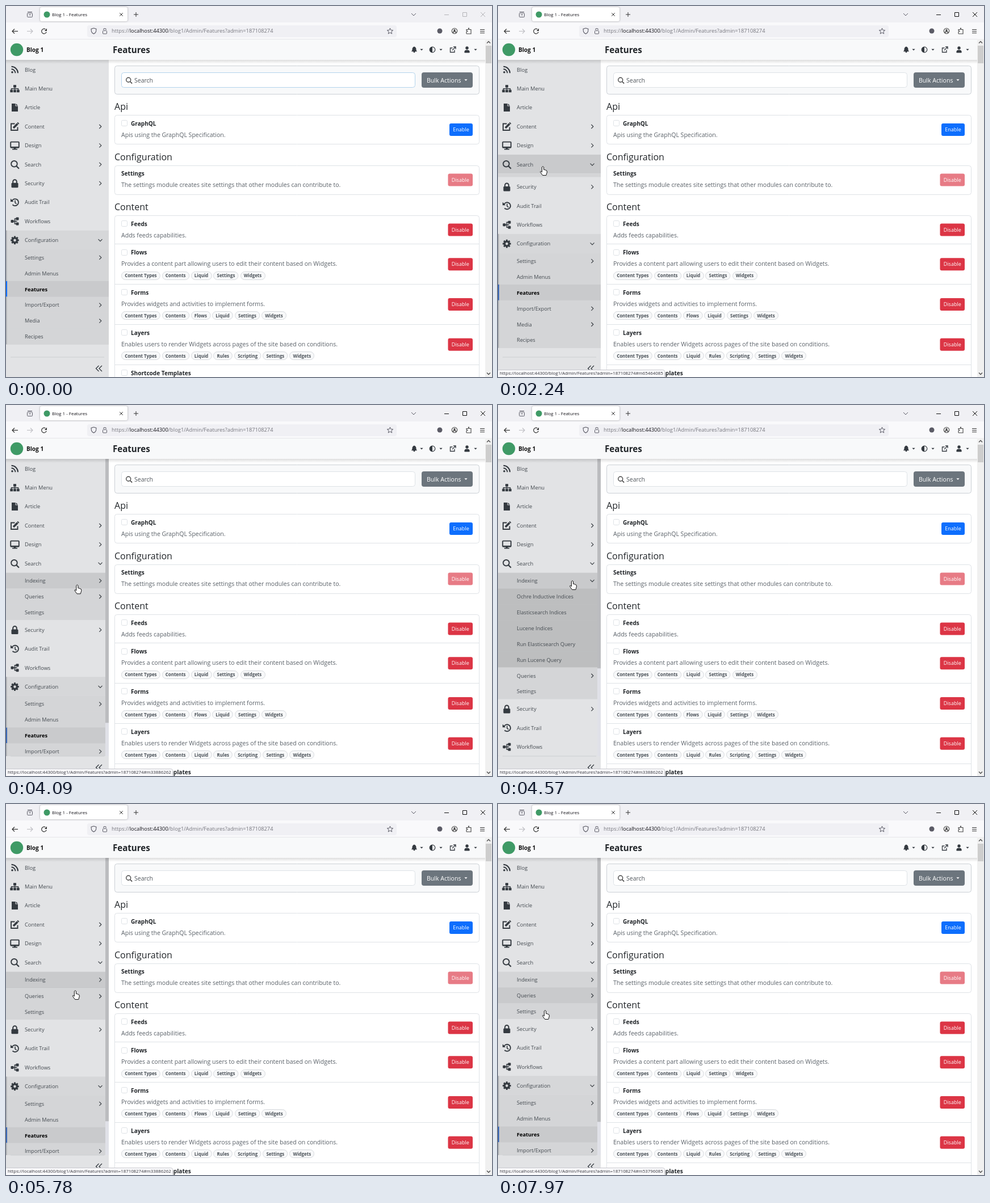
Animation, 856 px wide and 654 px high, one loop 8 s. Source, as an HTML page with a canvas:

```html
<!DOCTYPE html>
<html lang="en">
<head>
<meta charset="utf-8">
<title>Features</title>
<style>
html, body { margin: 0; width: 100%; height: 100%; overflow: hidden; background: #fff; }
canvas { display: block; }
</style>
</head>
<body>
<canvas id="stage" width="856" height="654"></canvas>
<script>
const c = document.getElementById('stage').getContext('2d');
const LOOP = 8000, ROW = 33.4, SUB = 27.9, TOP = 95, BOTTOM = 619;
const INK = '#212529', ICON = '#343a40', GREY = '#5b5b66', GREEN = '#3f9a66';
const URL_HEAD = 'https://', URL_HOST = 'localhost:44300', URL_PATH = '/blog1/Admin/Features?admin=187108274';

// ---- drawing helpers ----
function text(s, x, y, size, color = INK, weight = 400, align = 'left') {
  c.font = `${weight} ${size}px "Open Sans", "Noto Sans", sans-serif`;
  c.fillStyle = color;
  c.textAlign = align;
  c.fillText(s, x, Math.round(y + size * 0.36));
  return c.measureText(s).width;
}
function rect(x, y, w, h, color) {
  c.fillStyle = color;
  c.fillRect(x, y, w, h);
}
function box(x, y, w, h, r, fill, stroke) {
  c.beginPath();
  if (stroke) c.roundRect(Math.round(x) + 0.5, Math.round(y) + 0.5, w, h, r);
  else c.roundRect(x, y, w, h, r);
  if (fill) { c.fillStyle = fill; c.fill(); }
  if (stroke) { c.strokeStyle = stroke; c.lineWidth = 1; c.stroke(); }
}
function trace(pts, x, y) {
  c.beginPath();
  for (let i = 0; i < pts.length; i += 2) c.lineTo(x + pts[i], y + pts[i + 1]);
}
function line(pts, x, y, color, w = 1) {
  trace(pts, x, y);
  c.strokeStyle = color;
  c.lineWidth = w;
  c.stroke();
}
function shape(pts, x, y, color) {
  trace(pts, x, y);
  c.closePath();
  c.fillStyle = color;
  c.fill();
}
function dot(x, y, r, color) {
  c.beginPath();
  c.arc(x, y, r, 0, 7);
  c.fillStyle = color;
  c.fill();
}
function arc(x, y, r, a, b, color, w = 1) {
  c.beginPath();
  c.arc(x, y, r, a, b);
  c.strokeStyle = color;
  c.lineWidth = w;
  c.stroke();
}
const caret = (x, y, color) => shape([-2.6, -1.2, 2.6, -1.2, 0, 1.6], x, y, color);

function magnifier(x, y, r, color, w) {
  arc(x - r * 0.2, y - r * 0.2, r, 0, 7, color, w);
  line([r * 0.55, r * 0.55, r * 1.4, r * 1.4], x, y, color, w * 1.15);
}
function padlock(x, y, s, color) {
  box(x - 6 * s, y - 1 * s, 12 * s, 8.5 * s, 1.5 * s, color);
  c.beginPath();
  c.arc(x, y - 3.2 * s, 3.3 * s, Math.PI, 0);
  c.lineTo(x + 3.3 * s, y);
  c.moveTo(x - 3.3 * s, y - 3.2 * s);
  c.lineTo(x - 3.3 * s, y);
  c.strokeStyle = color;
  c.lineWidth = 2 * s;
  c.stroke();
}

// ---- sidebar icons, centred on x, y ----
const icons = {
  feed(x, y) {
    dot(x - 4.5, y + 4.5, 1.8, ICON);
    arc(x - 6, y + 6, 7, -Math.PI / 2, 0, ICON, 2);
    arc(x - 6, y + 6, 11.5, -Math.PI / 2, 0, ICON, 2);
  },
  tree(x, y) {
    rect(x - 2.5, y - 6.5, 5, 4.5, ICON);
    line([0, -2, 0, 2], x, y, ICON, 1.4);
    line([-6, 3, -6, 0, 6, 0, 6, 3], x, y, ICON, 1.4);
    for (const dx of [-8.2, -2.4, 3.4]) rect(x + dx, y + 2, 4.8, 4.5, ICON);
  },
  file(x, y) {
    shape([-5.5, -7, 1, -7, 1, -2.5, 5.5, -2.5, 5.5, 7, -5.5, 7], x, y, ICON);
    shape([2, -7, 5.5, -3.5, 2, -3.5], x, y, ICON);
  },
  edit(x, y) {
    line([0, -5, -6.5, -5, -6.5, 6.5, 5, 6.5, 5, 1], x, y, ICON, 1.9);
    line([-2.5, 2.5, 4.8, -4.8], x, y, ICON, 3.6);
    line([5.2, -5.2, 6.6, -6.6], x, y, ICON, 3.6);
  },
  screen(x, y) {
    c.beginPath();
    c.roundRect(x - 7.3, y - 6.3, 14.6, 9.8, 1);
    c.strokeStyle = ICON;
    c.lineWidth = 1.9;
    c.stroke();
    rect(x - 7.5, y + 2, 15, 2.5, ICON);
    rect(x - 1.7, y + 4, 3.4, 2.6, ICON);
    rect(x - 4.5, y + 5.8, 9, 1.7, ICON);
  },
  search(x, y) { magnifier(x, y, 5.3, ICON, 1.9); },
  lock(x, y) { padlock(x, y, 1, ICON); },
  history(x, y) {
    arc(x + 0.5, y, 6, -2.7, 2.4, ICON, 1.9);
    shape([-7.5, -6.5, -7.5, -1, -2, -1], x, y, ICON);
    line([0.5, -3.5, 0.5, 0.5, 3, 2.5], x, y, ICON, 1.6);
  },
  nodes(x, y) {
    line([-3, 0, 4, 0], x, y, ICON, 1.6);
    line([4, -4.5, 0, -4.5, 0, 4.5, 4, 4.5], x, y, ICON, 1.6);
    box(x - 7, y - 2.5, 5, 5, 1, ICON);
    box(x + 2, y - 7, 5, 5, 1, ICON);
    box(x + 2, y + 2, 5, 5, 1, ICON);
  },
  gear(x, y) {
    arc(x, y, 4, 0, 7, ICON, 3.4);
    for (let i = 0; i < 8; i++) {
      const a = i * Math.PI / 4, u = Math.cos(a), v = Math.sin(a);
      line([u * 5, v * 5, u * 7.3, v * 7.3], x, y, ICON, 3);
    }
  }
};

// ---- timing ----
const clamp = v => Math.max(0, Math.min(1, v));
const ease = v => 1 - Math.pow(1 - clamp(v), 2.4);
function fold(t, start, end = Infinity) {
  const amount = t < end ? ease((t - start) / 350) : 1 - ease((t - end) / 350);
  return { amount, on: t >= start && t < end };
}
const hovers = [[0, ''], [1410, 'Search'], [1640, 'Design'], [1850, 'Search'], [3090, 'Indexing'],
  [3620, 'Queries'], [4000, 'Indexing'], [5830, 'Queries']];
const hashes = { Search: 'm65464085', Design: 'm52718406', Indexing: 'm33886262', Queries: 'm53796085' };
const hoverAt = t => hovers.filter(h => h[0] <= t).pop()[1];

const path = [[310, 576, 534], [720, 229, 311], [1000, 229, 311], [1400, 120, 283], [1560, 62, 261],
  [1700, 58, 246], [1830, 58, 246], [1900, 79, 283], [2990, 79, 283], [3270, 95, 308], [3470, 95, 308],
  [3780, 112, 335], [4220, 131, 310], [5360, 131, 310], [5430, 130, 302], [5590, 130, 304],
  [5780, 122, 329], [5910, 114, 339], [7820, 114, 339], [7960, 83, 364], [LOOP, 83, 364]];

function drawCursor(t) {
  if (t < path[0][0]) return;
  const i = path.findIndex(p => p[0] > t), [t0, x0, y0] = path[i - 1], [t1, x1, y1] = path[i];
  const k = (t - t0) / (t1 - t0), x = x0 + (x1 - x0) * k, y = y0 + (y1 - y0) * k;
  const pts = x > 181
    ? [0, 0, 0, 13, 3, 10.4, 5, 15, 7, 14, 5, 9.6, 9, 9.6]
    : [-1.6, 1, 0, -0.3, 1.6, 1, 1.6, 5.4, 4.4, 6, 7, 7.4, 7.4, 10, 5.8, 15.5, -0.4, 15.5, -4.6, 9.6, -3.8, 8.2, -1.6, 9.8];
  shape(pts, x, y, '#fff');
  c.closePath();
  c.strokeStyle = '#111';
  c.lineWidth = 1;
  c.stroke();
}

// ---- browser frame ----
function drawBrowser(active) {
  rect(0, 0, 856, 29, '#f0f0f4');
  rect(0, 29, 856, 29, '#f9f9fb');
  c.save();
  c.shadowColor = 'rgba(0,0,0,.35)';
  c.shadowBlur = 3;
  box(60, 2, 154, 25, 3, '#fff');
  c.restore();
  box(37, 12, 9, 7, 1, null, GREY);
  line([-4, -4.5, 4, -4.5], 42, 15, GREY);
  line([-2, 0, 2, 0], 42, 15.5, GREY);
  dot(72, 15, 5.5, GREEN);
  text('Blog 1 - Features', 81, 15, 8, '#15141a');
  const cross = (x, y, r, col) => {
    line([-r, -r, r, r], x, y, col);
    line([-r, r, r, -r], x, y, col);
  };
  cross(203, 15, 2.8, '#333');
  line([-4, 0, 4, 0], 229, 15, '#333');
  line([0, -4, 0, 4], 229, 15, '#333');
  line([-4, -2, 0, 2, 4, -2], 718, 15, GREY);
  const btn = active ? '#111' : '#b4b4b8';
  line([-4, 0, 4, 0], 776, 15.5, btn);
  box(804, 11, 7, 7, 0, null, btn);
  cross(840, 15, 4, btn);

  const arrow = (x, d, col) => {
    line([-5, 0, 5, 0], x, 44.5, col, 1.2);
    line([-d, -4, -5 * d, 0, -d, 4], x, 44.5, col, 1.2);
  };
  arrow(16, 1, '#333');
  arrow(42, -1, '#c2c2c6');
  arc(67, 44.5, 4.3, 0.3, 5.3, '#333', 1.2);
  shape([5, -5, 5, -0.6, 0.8, -0.6], 67, 44.5, '#333');
  box(143, 34, 545, 21, 4, '#f0f0f4');
  line([0, -5, 4.5, -3.5, 4, 1, 2.5, 3.5, 0, 5, -2.5, 3.5, -4, 1, -4.5, -3.5, 0, -5], 154.5, 44, GREY, 1.1);
  box(170, 43, 7, 5.5, 1, null, GREY);
  arc(174, 42, 2.3, Math.PI, 0, GREY, 1.1);
  let x = 186;
  for (const [s, col] of [[URL_HEAD, '#77777f'], [URL_HOST, '#15141a'], [URL_PATH, '#77777f']])
    x += text(s, x, 44, 9.3, col);
  const star = [];
  for (let i = 0; i <= 10; i++) {
    const r = i % 2 ? 2.4 : 5.5, a = i * Math.PI / 5 - Math.PI / 2;
    star.push(r * Math.cos(a), r * Math.sin(a));
  }
  line(star, 676.5, 44.5, GREY, 1);
  dot(764, 44, 4.5, GREY);
  arc(790, 44, 4.7, 0, 7, '#444', 1.1);
  dot(790, 42.8, 1.8, '#444');
  arc(790, 47.6, 2.6, Math.PI, 0, '#444', 1.4);
  line([-4, 5, -4, 1.5, -2, 0.5, -4, -0.8, -4, -2.5, -1, -2.5, 0, -5, 1, -2.5, 4, -2.5, 4, 5, -4, 5], 815, 44, '#444', 1.1);
  for (const dy of [-3, 0, 3]) line([-4, 0, 4, 0], 839, 44.5 + dy, '#333');
}

// ---- page ----
function button(label, y, color) {
  const w = label === 'Enable' ? 41 : 43.5;
  box(822 - w, y - 11, w, 22, 3, color);
  text(label, 822 - w / 2, y, 9, '#fff', 400, 'center');
}
function feature(y, name, desc, tags = [], checkbox = true) {
  if (checkbox) box(203, y + 9, 10, 10, 2, '#fff', '#dee2e6');
  text(name, checkbox ? 220 : 203, y + 15, 10.1, INK, 700);
  text(desc, 203, y + 34.7, 10.56, '#5a6168');
  let x = 203;
  for (const tag of tags) {
    c.font = '700 7.9px "Open Sans", "Noto Sans", sans-serif';
    const w = c.measureText(tag).width + 11.5;
    box(x, y + 48, w, 14, 7, '#f8f9fa', '#d6d9dd');
    text(tag, x + 6.2, y + 55.7, 7.9, '#495057', 700);
    x += w + 3.8;
  }
}
function drawPage(focused) {
  rect(181, 95, 663, 559, '#fff');
  box(191, 105, 642, 50, 4, '#f8f9fa', '#cbd0d5');
  box(203, 117, 517, 26, 4, '#fff', focused ? '#b3d3ec' : '#dee2e6');
  magnifier(216.5, 131, 4, '#444', 1.4);
  text('Search', 226, 131, 10.5, '#50565c');
  box(732, 117, 90, 27, 4, '#6c757d');
  text('Bulk Actions', 741, 131, 10.6, '#fff');
  caret(810, 130.5, '#fff');

  text('Api', 191, 177.5, 16);
  box(191, 192, 642, 51, 4, '#fff', '#dee2e6');
  feature(192.3, 'GraphQL', 'Apis using the GraphQL Specification.');
  button('Enable', 218, '#0d6efd');

  text('Configuration', 191, 266, 16);
  box(191, 281, 642, 51, 4, '#fff', '#dee2e6');
  feature(280.7, 'Settings', 'The settings module creates site settings that other modules can contribute to.', [], false);
  button('Disable', 306.5, '#e77b85');

  text('Content', 191, 354.5, 16);
  box(191, 369, 642, 320, 4, '#fff', '#dee2e6');
  feature(369, 'Feeds', 'Adds feeds capabilities.');
  button('Disable', 394.5, '#dc3545');
  const list = [
    ['Flows', 'Provides a content part allowing users to edit their content based on Widgets.',
      ['Content Types', 'Contents', 'Liquid', 'Settings', 'Widgets']],
    ['Forms', 'Provides widgets and activities to implement forms.',
      ['Content Types', 'Contents', 'Flows', 'Liquid', 'Settings', 'Widgets']],
    ['Layers', 'Enables users to render Widgets across pages of the site based on conditions.',
      ['Content Types', 'Contents', 'Liquid', 'Rules', 'Scripting', 'Settings', 'Widgets']],
    ['Shortcode Templates', '']
  ];
  list.forEach((f, i) => {
    const y = 419.6 + i * 70.8;
    rect(191, Math.floor(y), 642, 1, '#dee2e6');
    feature(y, ...f);
    if (f[2]) button('Disable', y + 35.6, '#dc3545');
  });

  rect(844, 58, 12, 596, '#f0f0f0');
  rect(845, 70, 10, 31, '#cdcdcd');
  line([-3, 1.5, 0, -1.5, 3, 1.5], 850, 64, '#505050', 1.4);
  line([-3, -1.5, 0, 1.5, 3, -1.5], 850, 648, '#505050', 1.4);
}
function drawHeader() {
  const g = c.createLinearGradient(0, 95, 0, 102);
  g.addColorStop(0, 'rgba(0,0,0,.13)');
  g.addColorStop(1, 'rgba(0,0,0,0)');
  rect(0, 95, 844, 7, g);
  rect(0, 58, 844, 37, '#f8f9fa');
  rect(0, 58, 844, 1, '#e6e6ea');
  dot(19, 77, 11.2, GREEN);
  text('Blog 1', 36, 77, 10.1, '#111', 700);
  text('Features', 188, 77.5, 15.1, INK, 700);
  shape([-5, 3.2, -3.6, 1, -3.4, -2, -2, -4.4, 0, -5.4, 2, -4.4, 3.4, -2, 3.6, 1, 5, 3.2], 719, 77, ICON);
  dot(719, 80.8, 1.5, ICON);
  arc(751, 77, 4.8, 0, 7, ICON, 1.2);
  c.beginPath();
  c.arc(751, 77, 4.8, Math.PI / 2, -Math.PI / 2);
  c.fillStyle = ICON;
  c.fill();
  line([-0.5, -3, -4.5, -3, -4.5, 4.5, 3, 4.5, 3, 0.5], 787, 77, ICON, 1.3);
  line([1, -5, 5, -5, 5, -1], 787, 77, ICON, 1.3);
  line([-1, 1, 5, -5], 787, 77, ICON, 1.3);
  dot(812, 74, 2.7, ICON);
  box(807.3, 77.6, 9.4, 5, [4, 4, 1, 1], ICON);
  for (const x of [732, 766, 827]) caret(x, 77, ICON);
}

// ---- sidebar ----
function drawSidebar(t) {
  const search = fold(t, 2230), index = fold(t, 4225, 5480), query = fold(t, 6300, 7565);
  const hover = hoverAt(t);
  const inner = SUB * (5 * index.amount + 2 * query.amount);
  const extra = search.amount * (3 * SUB + inner);
  const scroll = extra > 20, width = scroll ? 175 : 181;
  let y = TOP;

  const chevron = (cy, down) =>
    line(down ? [-3.5, -1.7, 0, 1.8, 3.5, -1.7] : [-1.7, -3.5, 1.8, 0, -1.7, 3.5], 166, cy, '#3a3f44', 1.2);
  function item(name, icon, group) {
    const mid = y + ROW / 2 + 0.6;
    if (hover === name) rect(0, y, width, ROW, '#c9cacc');
    icons[icon](15.5, mid);
    text(name, 33, mid, 9.3, '#444a50');
    if (group !== undefined) chevron(mid, group);
    y += ROW;
  }
  function sub(name, bg, group) {
    const mid = y + SUB / 2 + 0.5, here = name === 'Features';
    rect(0, y, width, SUB + 0.5, here || hover === name ? '#c9cacc' : bg);
    if (here) rect(0, y, 2, SUB, t < 2100 ? '#0d6efd' : '#3765b5');
    text(name, 33, mid, 9.2, here ? '#000' : '#444a50', here ? 700 : 400);
    if (group !== undefined) chevron(mid, group);
    y += SUB;
  }
  // draws children inside a clipped, partly opened block
  function block(height, draw) {
    const start = y;
    c.save();
    c.beginPath();
    c.rect(0, start, width, height);
    c.clip();
    if (height > 0) draw();
    c.restore();
    y = start + height;
  }
  const deep = (names, state) =>
    block(names.length * SUB * state.amount, () => names.forEach(n => sub(n, '#bdbebf')));

  rect(0, TOP, 181, 559, '#e2e3e5');
  c.save();
  c.beginPath();
  c.rect(0, TOP, 181, BOTTOM - TOP);
  c.clip();
  item('Blog', 'feed');
  item('Main Menu', 'tree');
  item('Article', 'file');
  item('Content', 'edit', false);
  item('Design', 'screen', false);
  item('Search', 'search', search.on);
  block(extra, () => {
    sub('Indexing', '#d4d5d7', index.on);
    deep(['Ochre Inductive Indices', 'Elasticsearch Indices', 'Lucene Indices',
      'Run Elasticsearch Query', 'Run Lucene Query'], index);
    sub('Queries', '#d4d5d7', query.on);
    deep(['All queries', 'Run SQL Query'], query);
    sub('Settings', '#d4d5d7');
  });
  item('Security', 'lock', false);
  item('Audit Trail', 'history');
  item('Workflows', 'nodes');
  const top = y;
  rect(0, y, width, ROW, '#d6d7d9');
  item('Configuration', 'gear', true);
  sub('Settings', '#d4d5d7', false);
  sub('Admin Menus', '#d4d5d7');
  const active = y;
  sub('Features', '#d4d5d7');
  sub('Import/Export', '#d4d5d7', false);
  sub('Media', '#d4d5d7', false);
  sub('Recipes', '#d4d5d7');
  rect(0, top, 1.5, active - top, '#a9acaf');
  rect(0, active + SUB, 1.5, y - active - SUB, '#a9acaf');
  if (scroll) {
    const view = BOTTOM - TOP;
    rect(175, TOP, 6, view, '#e0e1e8');
    rect(175, TOP, 6, view * view / (498 + extra * 1.1), '#bbbcbf');
  }
  c.restore();
  rect(8, 618.5, 165, 1, '#cdcfd2');
  for (const dx of [-3, 2.5]) line([2.5, -5, -2.5, 0, 2.5, 5], 164 + dx, 639, ICON, 1.3);
}

function drawStatus(t) {
  const hover = hoverAt(t);
  if (!hover) return;
  c.save();
  c.globalAlpha = clamp((t - 1450) / 170);
  box(-2, 641, 295, 16, 3, '#f9f9fb', '#c8c8ce');
  text(URL_HEAD + URL_HOST + URL_PATH + '#' + hashes[hover], 3, 647.5, 7.84, '#33333b');
  c.restore();
}

function frame() {
  const t = performance.now() % LOOP;
  c.clearRect(0, 0, 856, 654);
  drawBrowser(t >= 2100);
  drawPage(t < 70);
  drawSidebar(t);
  drawHeader();
  drawStatus(t);
  drawCursor(t);
  requestAnimationFrame(frame);
}
frame();
</script>
</body>
</html>
```
